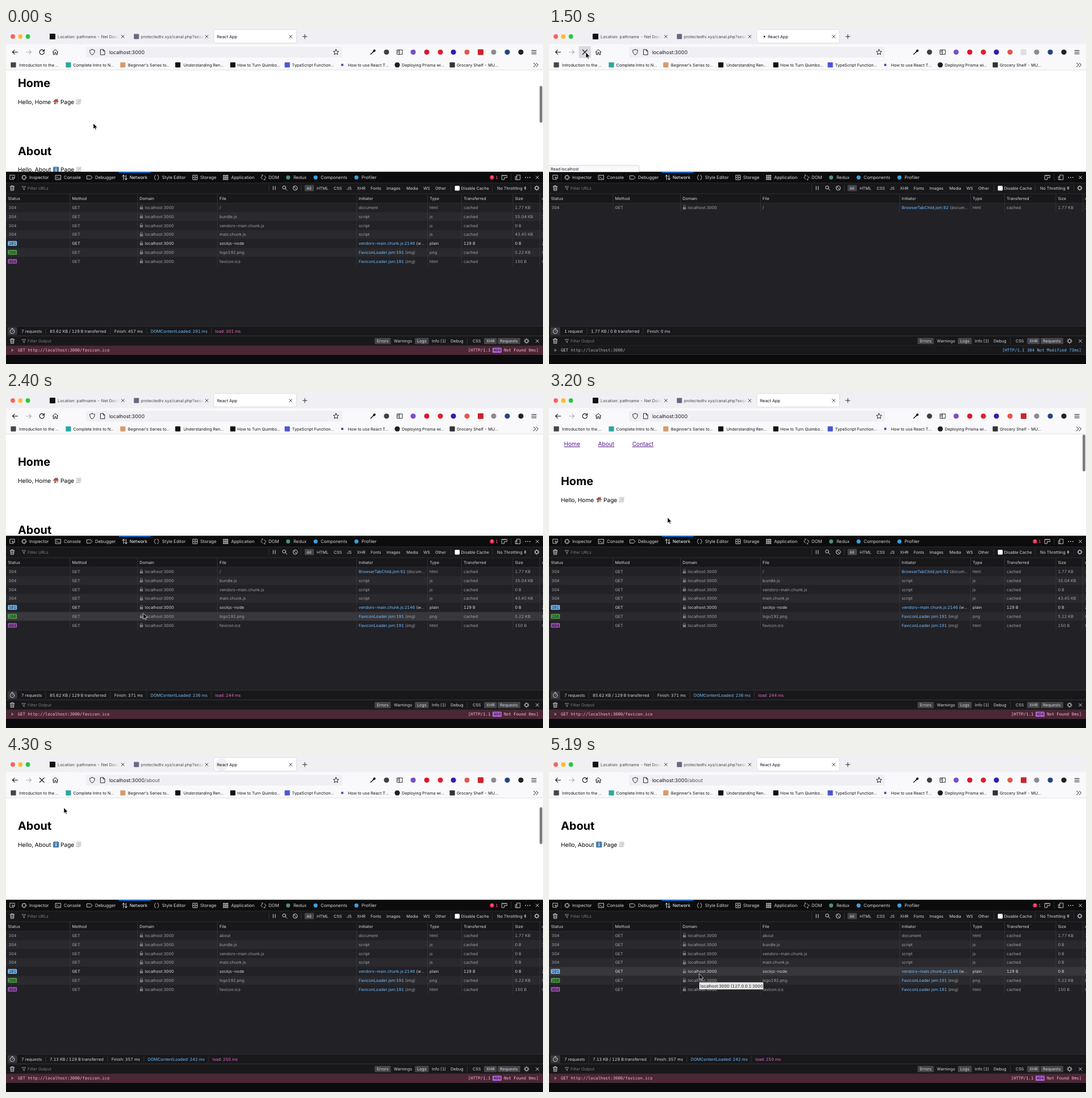
An HTML page for the animation above (5.29 s loop, 947x592 px).

```html
<!DOCTYPE html>
<html lang="en">
<head>
<meta charset="utf-8">
<title>Page reload in the network panel</title>
<style>
html, body { margin: 0; width: 100%; height: 100%; overflow: hidden; background: #fff; }
svg { display: block; width: 100%; height: 100%; }
text { font-family: Inter, sans-serif; white-space: pre; text-rendering: geometricPrecision; font-variant-numeric: tabular-nums; }
.mono { font-family: "DejaVu Sans Mono", monospace; }
.link { text-decoration: underline; text-decoration-thickness: .7px; text-underline-offset: 1.6px; }
</style>
</head>
<body>
<svg viewBox="0 0 947 592">
  <defs>
    <linearGradient id="fade">
      <stop stop-color="#f0f0f4" stop-opacity="0"/>
      <stop offset="1" stop-color="#f0f0f4"/>
    </linearGradient>
  </defs>
  <g id="page"></g>
  <g id="frame"></g>
  <g id="live"></g>
</svg>
<script>
const LOOP = 5290;
const INK = '#15141a', LIGHT = '#d7d7db', DIM = '#a2a2a6', FAINT = '#77777b', BLUE = '#75bfff', LINE = '#38383d';
const $ = id => document.getElementById(id);

// Drawing helpers; text is placed by its vertical centre.
const text = (x, y, s, size = 7.2, fill = LIGHT, more = '') =>
  `<text x="${x}" y="${y + size * .36}" font-size="${size}" fill="${fill}" ${more}>${s}</text>`;
const mono = (x, y, s, fill, more = '') => text(x, y, s, 7.25, fill, `class="mono" ${more}`);
const rect = (x, y, w, h, fill, r = 0) =>
  `<rect x="${x}" y="${y}" width="${w}" height="${h}" rx="${r}" fill="${fill}"/>`;
const dot = (x, y, r, fill, more = '') => `<circle cx="${x}" cy="${y}" r="${r}" fill="${fill}" ${more}/>`;
const box = (x, y, r, fill) => rect(x - r, y - r, 2 * r, 2 * r, fill, 1);
const icon = (x, y, d, color = LIGHT, width = 1, fill = 'none') =>
  `<path transform="translate(${x} ${y})" d="${d}" fill="${fill}" stroke="${color}" stroke-width="${width}" stroke-linecap="round" stroke-linejoin="round"/>`;
const each = (list, fn) => list.map(fn).join('');

const GLYPH = {
  cross: 'M-2.5-2.5L2.5 2.5M2.5-2.5L-2.5 2.5',
  plus: 'M-3.8 0H3.8M0-3.8V3.8',
  back: 'M4.5 0H-4.5M-.8-3.7L-4.5 0L-.8 3.7',
  reload: 'M3.3-2.8A4.2 4.2 0 1 0 4.2 .4M4.2-4.6V-1.6H1.2',
  stop: 'M-4-4L4 4M4-4L-4 4',
  home: 'M-4.8-.2L0-4.6L4.8-.2M-3.6-1V4.4H-1.2V1H1.2V4.4H3.6V-1',
  shield: 'M0-4.8C1.5-3.8 3-3.4 4.3-3.4C4.3 1 3 3.6 0 4.9C-3 3.6-4.3 1-4.3-3.4C-3-3.4-1.5-3.8 0-4.8Z',
  sheet: 'M-3.6-4.6H1L3.6-2V4.6H-3.6ZM1-4.6V-2H3.6',
  star: 'M0-4.8L1.4-1.6L4.8-1.3L2.2 1L3 4.4L0 2.6L-3 4.4L-2.2 1L-4.8-1.3L-1.4-1.6Z',
  wrench: 'M-3.8 3.8L1-1M1-1A2.4 2.4 0 0 1 3.2-4L2.2-2.2L4.2-3A2.4 2.4 0 0 1 1-1',
  panel: 'M-4.5-3.8H4.5V3.8H-4.5ZM-1-3.8V3.8M-3.3-2H-2.4M-3.3 0H-2.4',
  menu: 'M-4-3H4M-4 0H4M-4 3H4',
  more: 'M-3.5-3.5L0 0L-3.5 3.5M1-3.5L4.5 0L1 3.5',
  trash: 'M-3.8-2.8H3.8M-1.4-2.8V-4.2H1.4V-2.8M-3-2.8L-2.6 4.2H2.6L3-2.8M-1-1V2.6M1-1V2.6',
  funnel: 'M-3-2.8H3L.8 .2V3L-.8 2V.2Z',
  pick: 'M4.2-.5V-4.2H-4.2V3.2H-.8M-.2-.6L1.4 4.2L2.2 2L4.4 1.2Z',
  inspect: 'M-2.8-2.8H2.8V2.8H-2.8ZM-4.5 0H-2.8M4.5 0H2.8M0-4.5V-2.8M0 4.5V2.8',
  console: 'M-4.5-3.8H4.5V3.8H-4.5ZM-2.6-1.4L-1 0L-2.6 1.4M.4 1.6H2.4',
  tag: 'M-4.6-3H1.6L4.8 0L1.6 3H-4.6Z',
  arrows: 'M-2.2 4V-4M-4.4-1.8L-2.2-4L0-1.8M2.2-4V4M0 1.8L2.2 4L4.4 1.8',
  braces: 'M-1.6-4C-4-4-2-1-4.4 0C-2 1-4 4-1.6 4M1.6-4C4-4 2-1 4.4 0C2 1 4 4 1.6 4',
  storage: 'M-3.8-4H3.8V4H-3.8ZM-3.8 0H3.8M-1-2H1M-1 2H1',
  grid: 'M-4-4H-2.4V-2.4H-4ZM-.8-4H.8V-2.4H-.8ZM2.4-4H4V-2.4H2.4ZM-4-.8H-2.4V.8H-4ZM-.8-.8H.8V.8H-.8ZM2.4-.8H4V.8H2.4ZM-4 2.4H-2.4V4H-4ZM-.8 2.4H.8V4H-.8ZM2.4 2.4H4V4H2.4Z',
  angle: 'M-1.6-3L-4.6 0L-1.6 3M1.6-3L4.6 0L1.6 3M-3-4.2H-1M1 4.2H3',
  ruler: 'M-4.4-3.8H4.4V.4H-.4V3.8H-4.4ZM-2-3.8V-2M1-3.8V-2',
  dock: 'M-1.4-4.2H4.2V4H-1.4ZM-1.4-1.4H-4.2V4H-1.4',
  dots: 'M-3.8 0H-3.7M0 0H.1M3.8 0H3.9',
  pause: 'M-1.8-3V3M1.8-3V3',
  search: 'M1.2 1.2L4 4M1.8-1A2.8 2.8 0 1 1-3.8-1A2.8 2.8 0 1 1 1.8-1',
  block: 'M3.8 0A3.8 3.8 0 1 1-3.8 0A3.8 3.8 0 1 1 3.8 0M-2.6-2.6L2.6 2.6',
  gear: 'M2.8 0A2.8 2.8 0 1 1-2.8 0A2.8 2.8 0 1 1 2.8 0M0-4.4V-3M0 4.4V3M-4.4 0H-3M4.4 0H3M-3.1-3.1L-2.1-2.1M3.1 3.1L2.1 2.1M-3.1 3.1L-2.1 2.1M3.1-3.1L2.1-2.1',
  clock: 'M3.8 .5A3.8 3.8 0 1 1-3.8 .5A3.8 3.8 0 1 1 3.8 .5M-1.2-4.6H1.2M0 .5L1.6-1.1',
  updown: 'M-1.4-1L0-2.6L1.4-1ZM-1.4 1L0 2.6L1.4 1Z',
  arrow: 'M0 0V10L2.3 7.9L3.8 11.4L5.4 10.8L4 7.4H7Z',
  hand: 'M2 1.2Q3-.3 4 1.2V4.4L7.6 5.3Q8.6 6 8.2 8L7.4 11H3.2L.3 7Q0 5.6 1.4 6.1L2 6.7Z'
};

function browserFrame() {
  const fadedTab = (x, s, end) =>
    text(x, 15, s, 7.3, '#45444b') + rect(end - 14, 6, 16, 18, 'url(#fade)');
  const marks = [
    [13, '#444', 23, 'Introduction to the ...'], [110, '#2aa7a0', 118.5, 'Complete Intro to N...'],
    [206, '#d99a6c', 215, "Beginner's Series to..."], [303, '#111', 313, 'Understanding Ren...'],
    [400, '#111', 408, 'How to Turn Quimbo...'], [496, '#4b55d6', 504.5, 'TypeScript Function...'],
    [593, '#6f3fc0', 603, 'How to use React T...'], [690, '#1b1f23', 698, 'Deploying Prisma wi...'],
    [787, '#333', 795, 'Grocery Shelf - MU...']
  ];
  const badges = [[671, '#3f3e45'], [718, '#7a4fc4'], [742, '#d9182d'], [766, '#e01f2d'],
    [789, '#2d1fb0'], [813, '#e2574c'], [860, '#8b8b90'], [884, '#24467f'], [908, '#222']];
  return rect(0, 0, 947, 29, '#f0f0f4') + rect(0, 28.5, 947, 45.5, '#f9f9fb') + rect(0, 73.6, 947, .7, '#d3d3d8') +
    each(['#ff5f57', '#febc2e', '#28c840'], (c, i) => dot(12 + 13.3 * i, 15, 3.9, c)) +
    box(82, 15, 5, '#111') + fadedTab(91, 'Location: pathname - Net Docs', 198) +
    box(230, 15, 4.5, '#6b6480') + fadedTab(238, 'protectedtv.xyz/canal.php?sess', 348) +
    `<rect x="366.5" y="2.8" width="146" height="23.6" rx="2.5" fill="#fff" stroke="#d6d6dc" stroke-width=".8"/>` +
    each([206, 354, 502], x => icon(x, 15, GLYPH.cross, '#333', .9)) + icon(527, 15, GLYPH.plus, INK, .9) +
    icon(16, 42.5, GLYPH.back, INK, 1.1) +
    `<g transform="translate(80 0) scale(-1 1)">${icon(40, 42.5, GLYPH.back, '#aeaeb3', 1.1)}</g>` +
    icon(87, 42.5, GLYPH.home, INK) + rect(141.5, 33, 451.5, 19, '#f0f0f4', 2.5) +
    icon(152, 42.5, GLYPH.shield, INK, .9) + icon(170.5, 42.5, GLYPH.sheet, INK, .9) + icon(582, 42.5, GLYPH.star, INK, .9) +
    icon(647, 42.5, GLYPH.wrench, INK, 1.5) + icon(694.5, 42.5, GLYPH.panel, INK, .9) +
    each(badges, ([x, c]) => dot(x, 42.5, 4.6, c)) + icon(931, 42.5, GLYPH.menu, INK, 1) +
    each(marks, ([x, c, tx, s]) => (x === 690 ? dot : box)(x, 65, x === 593 ? 2 : 4.6, c) + text(tx, 65, s, 7.2, INK)) +
    icon(934, 65, GLYPH.more, INK, 1);
}

const COLUMNS = [113, 232, 373, 618.5, 743.5, 803.5, 894, 941.5];

function toolsFrame() {
  const tabs = [[32, 'inspect', 41, 'Inspector'], [92, 'console', 102, 'Console'], [147.5, 'tag', 157, 'Debugger'],
    [209.5, 'arrows', 218, 'Network'], [265.5, 'braces', 275, 'Style Editor'], [333.5, 'storage', 342.5, 'Storage'],
    [387.5, 'grid', 397, 'Application'], [454, 'angle', 463, 'DOM']];
  const addons = [[497.5, '#4d8f7a', 507, 'Redux'], [546, '#3b9fd8', 555, 'Components'], [618, '#3b9fd8', 627, 'Profiler']];
  const filters = [[530, 'All'], [548, 'HTML'], [578, 'CSS'], [601, 'JS'], [619, 'XHR'], [643, 'Fonts'],
    [671, 'Images'], [706, 'Media'], [736, 'WS'], [757, 'Other']];
  const levels = [[654, 'Errors'], [684, 'Warnings'], [725, 'Logs'], [751, 'Info (1)'], [784, 'Debug'],
    [823, 'CSS'], [847, 'XHR'], [871, 'Requests']];
  const heads = ['Status', 'Method', 'Domain', 'File', 'Initiator', 'Type', 'Transferred', 'Size', 'd'];
  const filterBar = (y, label) => icon(11, y, GLYPH.trash, LIGHT, .9) + icon(31.5, y, GLYPH.funnel, DIM, .8) + text(38, y, label, 7.2, '#7c7c80');
  const bar = (x, y) => rect(x, y - 6, .8, 12, LINE);
  return rect(0, 253.5, 947, 338.5, '#212126') + rect(0, 253.5, 947, 19.5, '#0c0c0d') + rect(199, 253.5, 56, 1.6, '#0a84ff') +
    icon(11, 263.5, GLYPH.pick, LIGHT, .9) + bar(21, 263) +
    each(tabs, ([x, g, tx, s]) => {
      const color = s === 'Network' ? '#fff' : LIGHT;
      return icon(x, 263.3, GLYPH[g], color, .9) + text(tx, 263.3, s, 7.75, color);
    }) +
    each(addons, ([x, c, tx, s]) => dot(x, 263.3, 3.6, c) + text(tx, 263.3, s, 7.75)) +
    icon(879, 263.3, GLYPH.ruler, LIGHT, .9) + bar(890.5, 263) + icon(902.5, 263.3, GLYPH.dock, LIGHT, .9) +
    icon(920, 263.3, GLYPH.dots, LIGHT, 1.8) + icon(937, 263.3, GLYPH.cross, LIGHT, 1) +
    rect(0, 273, 947, 35.5, '#18181a') + rect(0, 272.6, 947, .7, LINE) + rect(0, 291.6, 947, .7, LINE) + rect(0, 308, 947, .7, LINE) +
    filterBar(282, 'Filter URLs') + each([463, 520, 784, 857, 925], x => bar(x, 282)) +
    icon(473, 282, GLYPH.pause) + icon(491.5, 282, GLYPH.search) + icon(510, 282, GLYPH.block) +
    rect(526.5, 276.5, 16.5, 11, '#434348', 1.5) + each(filters, ([x, s]) => text(x, 282, s)) +
    rect(791.5, 278, 8.5, 8.5, '#fff', 1.5) + text(802.5, 282, 'Disable Cache', 7.25) +
    text(866, 282, 'No Throttling', 7.25) + icon(915.5, 282, GLYPH.updown, LIGHT, .5, LIGHT) + icon(936, 282, GLYPH.gear, LIGHT, 1) +
    each(heads, (s, i) => text(i ? COLUMNS[i - 1] + 3.5 : 3.5, 300.3, s)) + each(COLUMNS, x => rect(x - .4, 292, .8, 16, LINE)) +
    rect(0, 525.5, 947, 34.5, '#18181a') + rect(0, 525.3, 947, .7, LINE) + rect(0, 542, 947, .9, LINE) + rect(0, 559.6, 947, .7, LINE) +
    rect(2.5, 527, 17, 14, '#37373c', 1.5) + icon(11, 534, GLYPH.clock, LIGHT, .9) +
    filterBar(551.5, 'Filter Output') + bar(813, 551.5) +
    each([[650, 28.5], [721, 24.5], [843, 22.5], [867, 40]], ([x, w]) => rect(x, 546, w, 11, '#434348', 1.5)) +
    each(levels, ([x, s]) => text(x, 551.5, s)) + icon(918, 551.5, GLYPH.gear, LIGHT, 1) + icon(937, 551.5, GLYPH.cross, LIGHT, 1) +
    rect(0, 560, 947, 32, '#0b0b0d');
}

// Linear path through [time, ...values] points.
function along(points, t) {
  const i = points.findIndex(p => p[0] > t);
  if (i < 0) return points[points.length - 1].slice(1);
  const a = points[i - 1], b = points[i], u = (t - a[0]) / (b[0] - a[0]);
  return a.slice(1).map((v, n) => v + (b[n + 1] - v) * u);
}

const POINTER = [[0, 154, 168], [500, 154, 168], [600, 144, 156], [700, 119, 129], [800, 67, 48], [1100, 65, 43],
  [1800, 65, 43], [1900, 74, 70], [2000, 105, 130], [2200, 205, 320], [2300, 236, 381], [2400, 242, 390], [2600, 242, 390],
  [2700, 243, 404], [2800, 238, 404], [3000, 220, 270], [3200, 209, 221], [3400, 160, 140], [3500, 95, 95], [3600, 30, 89],
  [3700, 60, 91], [3800, 94, 92], [3900, 102, 91], [4300, 102, 91], [4400, 120, 118], [4500, 190, 225], [4600, 256, 317],
  [4700, 261, 342], [4800, 264, 372], [4900, 265, 384]];
const SCROLL = [[0, 60], [100, 53], [200, 53], [300, 44], [400, 38], [600, 34], [3000, 34], [3100, 12], [3200, 0],
  [4200, 0], [4201, 34]];

const ERROR_URL = 'favicon.ico';
const between = (t, a, b) => t >= a && t < b;
const LOADS = [
  { begin: 1300, clear: 1300, blank: 1400, request: 1500, done: 1700, idle: 1800, path: '' },
  { begin: 3900, clear: 4100, blank: 4100, request: 4200, done: 4300, idle: 4500, path: 'about' }
];
const TOTALS = [
  ['85.62 KB', [457, 291, 301], [27, 77, 191, 255, 369]],
  ['85.62 KB', [371, 236, 244], [27, 77, 191, 255, 369]],
  ['7.13 KB', [357, 242, 250], [27, 77, 186, 250, 364]]
];

function emoji(kind, x, y) {
  if (kind === 'Home') return rect(x + 1.5, y - 1, 7.5, 5.5, '#e4d3bd') + icon(x + 5, y, 'M-4.6-.4L0-4.6L4.6-.4Z', '#a63b36', .8, '#b8433c') +
    rect(x + 2.5, y + .6, 2, 3.9, '#7b4a32') + rect(x + 6, y + .6, 2, 2, '#5fa0c8') + rect(x + 7, y - 5, 1.4, 3, '#9b4a3e');
  if (kind === 'About') return rect(x, y - 5, 10.5, 10.5, '#4b7fae', 1.5) + text(x + 5.2, y, 'i', 9, '#fff', 'font-weight="700" text-anchor="middle"');
  return icon(x + 5, y, 'M-3.2-4.4H4.4L3.6 3.8H-4.6L-3.8 2Z', '#b5b5b5', .5, '#e4e4e4') +
    each([-2.6, -1, .6], d => rect(x + 3, y + d, 5, .5, '#aaa')) + rect(x + .4, y + 3.2, 7, 1.3, '#bdbdbd', .6);
}

function section(name, y) {
  const line = y + 33.2;
  return text(21, y, name, 19.9, '#000', 'font-weight="700"') + text(21, line, `Hello, ${name}`, 10.15, '#000') +
    emoji(name, 83, line - .4) + text(96, line, 'Page', 10.15, '#000') + emoji('sheet', 123, line - .4);
}

function pageView(t, scroll) {
  if (LOADS.some(l => between(t, l.blank, l.done))) return '';
  const shown = t < 4300 ? ['Home', 'About'] : ['About'];
  const thumb = t < 1400 || between(t, 1700, 2200) || between(t, 3100, 4500);
  return each(['Home', 'About', 'Contact'], (s, i) => text(26.5 + 60.1 * i, 91.5 - scroll, s, 10.15, '#551a8b', 'class="link"')) +
    each(shown, (s, i) => section(s, 157 - scroll + 119.6 * i)) +
    (thumb ? rect(941, 75 + scroll * .45, 4.8, 65, '#7d7d7d', 2.4) : '');
}

function requests(run) {
  const link = (s, rest) => `<tspan fill="${BLUE}">${s}</tspan>${rest}`;
  const start = run === 1 ? link('BrowserTabChild.jsm:92', ' (docum...') : 'document';
  const size = s => run === 2 ? '0 B' : s;
  const icons = link('FaviconLoader.jsm:191', ' (img)');
  return [
    [304, run === 2 ? 'about' : '/', start, 'html', 'cached', '1.77 KB', 1],
    [304, 'bundle.js', 'script', 'js', 'cached', size('35.04 KB'), 1],
    [304, 'vendors~main.chunk.js', 'script', 'js', 'cached', '0 B', 1],
    [304, 'main.chunk.js', 'script', 'js', 'cached', size('43.45 KB'), 1],
    [101, 'sockjs-node', link('vendors~main.chunk.js:2146', ' (w...'), 'plain', '129 B', '0 B', 2],
    [200, 'logo192.png', icons, 'png', 'cached', '5.22 KB', 0],
    [404, ERROR_URL, icons, 'html', 'cached', '150 B', 0]
  ];
}

function requestRow([status, file, initiator, type, moved, size, wait], i, hoverY) {
  const top = 308.6 + 15.78 * i, y = top + 7.8, color = status === 101 ? LIGHT : DIM;
  const badge = { 101: '#6fb9f8', 200: '#4f9b48', 404: '#9a4bb0' }[status];
  const fill = between(hoverY, top, top + 15.78) ? '#37373c' : i % 2 ? '#2a2a2e' : '#212126';
  const cells = ['GET', '', file, initiator, type, moved, size, wait];
  return rect(0, top, 947, 15.78, fill) + each(COLUMNS, x => rect(x - .4, top, .8, 15.78, LINE)) +
    (badge ? rect(3.3, y - 4.2, 16, 8.4, badge, 1.5) : '') +
    (badge ? mono(4.7, y, status, '#16161a') : text(4.5, y, status, 7.2, color)) +
    rect(236, y - 1, 5.6, 4.4, FAINT, .6) + icon(238.8, y - 1, 'M-1.6 0V-1.4A1.6 1.6 0 0 1 1.6-1.4V0', FAINT, .9) +
    text(245, y, 'localhost:3000', 7.2, color) +
    each(cells, (s, n) => text(COLUMNS[n] + 3.5, y, s, 7.2, color));
}

function footer(parts, xs) {
  const colors = [LIGHT, LIGHT, LIGHT, BLUE, '#e96cce'];
  return each(parts, (s, i) => text(xs[i], 534, s, 7.25, colors[i]) + (i ? rect(xs[i] - 7.4, 528, .8, 12, LINE) : ''));
}

function networkView(t, hoverY) {
  const load = LOADS.find(l => between(t, l.clear, l.done));
  if (load) {
    if (t < load.request) return footer(['No requests'], [27]);
    const url = `<tspan fill="${LIGHT}">GET</tspan> http://localhost:3000/${load.path}`;
    return requestRow(requests(load.path ? 2 : 1)[0], 0, hoverY) +
      footer(['1 request', '1.77 KB / 0 B transferred', 'Finish: 0 ms'], [27, 74, 173]) +
      rect(0, 560, 947, 15.2, '#19191c') + rect(0, 575, 947, .7, LINE) +
      icon(11.5, 567.7, 'M-1.6-2.6L2 0L-1.6 2.6Z', FAINT, .3, FAINT) + mono(21, 567.7, url, '#b1b1b3') +
      mono(939, 567.7, '[HTTP/1.1 304 Not Modified 73ms]', BLUE, 'text-anchor="end"');
  }
  const run = LOADS.filter(l => t >= l.done).length;
  const [amount, [finish, dom, full], xs] = TOTALS[run];
  return each(requests(run), (r, i) => requestRow(r, i, hoverY)) +
    footer(['7 requests', `${amount} / 129 B transferred`, `Finish: ${finish} ms`, `DOMContentLoaded: ${dom} ms`, `load: ${full} ms`], xs) +
    rect(0, 560, 947, 15.2, '#4a2735') + rect(0, 575, 947, .7, '#5f3344') +
    icon(11.5, 567.7, 'M-1.6-2.6L2 0L-1.6 2.6Z', '#9b7683', .3, '#9b7683') +
    mono(21, 567.7, `GET http://localhost:3000/${ERROR_URL}`, '#ffb3d2') +
    mono(815, 567.7, '[HTTP/1.1', '#ffb3d2') + rect(858, 563.2, 16, 9, '#b064d8', 1.5) + mono(859.5, 567.7, '404', '#1b1020') +
    mono(939, 567.7, 'Not Found 0ms]', '#ffb3d2', 'text-anchor="end"') +
    dot(857, 263.3, 3.8, '#e22850') + text(857, 263.3, '!', 6, '#fff', 'font-weight="700" text-anchor="middle"') + text(863, 263.3, '1', 7.5, '#ff5c7c');
}

function statusPanel(s, width) {
  return `<path d="M0 242H${width - 2}Q${width} 242 ${width} 244V253.5H0Z" fill="#f9f9fb" stroke="#c4c4ca" stroke-width=".7"/>` + text(3, 248.2, s, 7.1, INK);
}

function chromeView(t, x, y) {
  const load = LOADS.find(l => between(t, l.begin, l.done));
  const busy = LOADS.some(l => between(t, l.clear, l.idle));
  const blank = LOADS.some(l => between(t, l.blank, l.done));
  const burst = LOADS.find(l => t === l.done);
  const overReload = between(x, 52, 75) && between(y, 32, 54);
  const path = t >= 4200 ? '<tspan fill="#55545c">/about</tspan>' : '';
  return text(load ? 386 : 372, 15, 'React App', 7.35, INK) +
    (load ? dot(379 - 5 * Math.cos(Math.PI * (t - load.begin - 100) / 180), 15, 1.5, INK) : '') +
    (burst ? dot(380, 15, 11, INK, 'opacity=".06"') : '') +
    (overReload ? rect(52.5, 32, 21.5, 21, '#d9d9de', 2.5) : '') +
    icon(63.3, 42.5, busy ? GLYPH.stop : GLYPH.reload, INK, 1.1) +
    text(182, 42.5, 'localhost:3000' + path, 8.75, INK) +
    box(837, 42.5, 5, blank ? '#dededf' : '#c9252b') +
    (blank ? statusPanel('Read localhost', 159) : '') +
    (between(t, 3900, 4100) ? statusPanel('localhost:3000/about', 79) : '');
}

function draw(t) {
  const [x, y] = along(POINTER, t), [scroll] = along(SCROLL, t);
  const onLink = between(t, 3500, 4300);
  $('page').innerHTML = rect(0, 74, 947, 180, '#fff') + pageView(t, scroll);
  $('live').innerHTML = networkView(t, y) + chromeView(t, x, y) +
    (t >= 5200 ? rect(265, 398.8, 113, 12.4, '#e6e6e6', 1) + text(267, 405, 'localhost:3000 (127.0.0.1:3000)', 7.2, '#222') : '') +
    (onLink ? icon(x, y, GLYPH.hand, '#000', .8, '#fff') : icon(x, y, GLYPH.arrow, '#fff', .7, '#000'));
}

$('frame').innerHTML = browserFrame() + toolsFrame();
const origin = performance.now();
let shown = -1;
function tick() {
  const elapsed = (performance.now() - origin) % LOOP;
  const step = Math.floor((elapsed + 10) / 100) * 100;
  if (step !== shown) draw(shown = step);
  requestAnimationFrame(tick);
}
tick();
</script>
</body>
</html>
```
